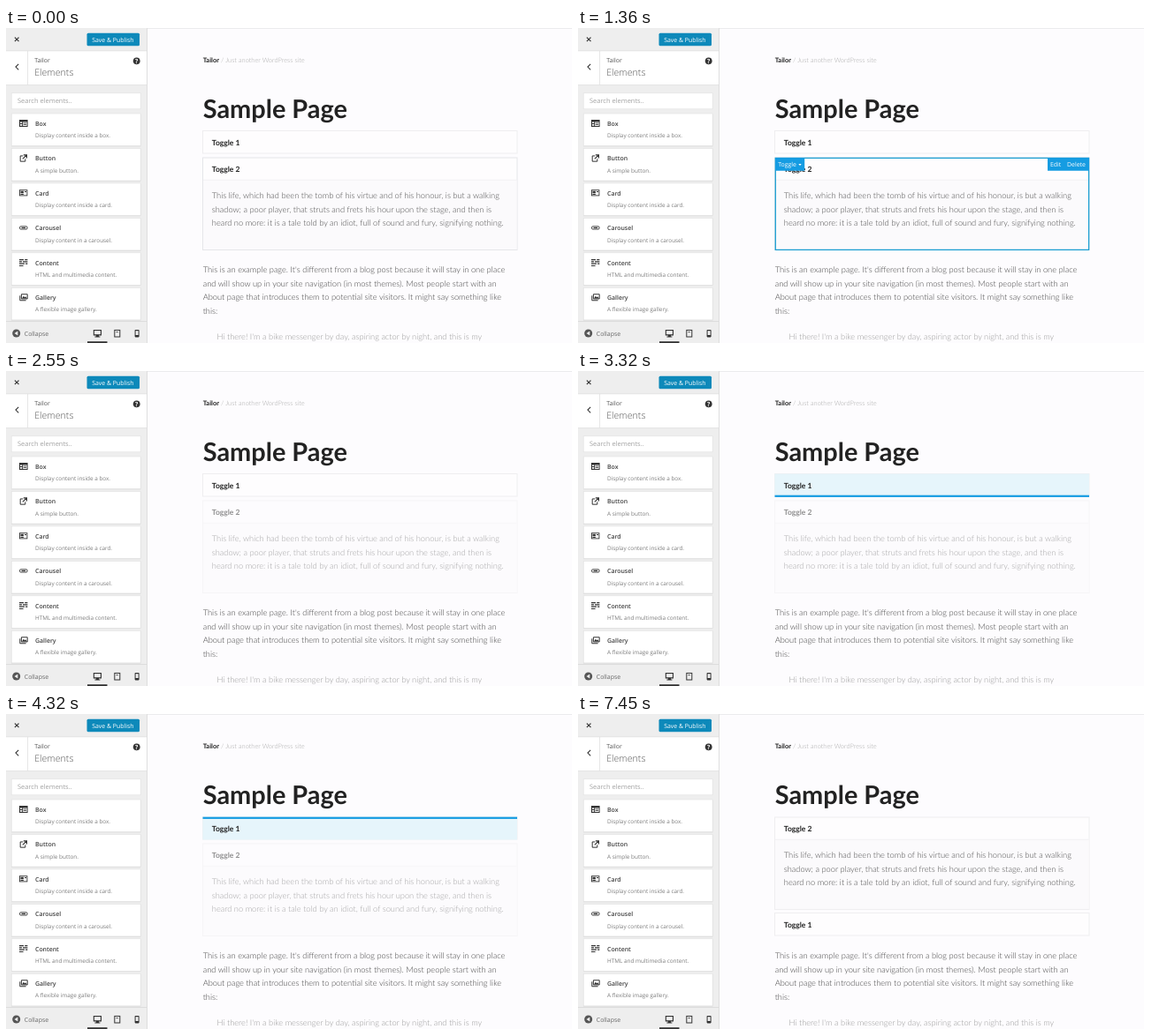
Animation, 640 px wide and 357 px high, one loop 7.72 s. Source, as an HTML page:

```html
<!DOCTYPE html>
<html lang="en">
<head>
<meta charset="utf-8">
<title>Page builder</title>
<style>
  html, body { margin: 0; width: 100%; height: 100%; overflow: hidden; background: #fdfcfe; }
  svg { display: block; width: 100%; height: 100%; }
  text { text-rendering: geometricPrecision; white-space: pre; }

  .ui { font: 6.93px "Open Sans", sans-serif; fill: #555; }
  .ui .heading { font-size: 10.66px; font-weight: 300; }
  .ui .name { font-weight: 600; fill: #404040; }
  .ui .note { font-size: 6.4px; fill: #7c7c7c; }
  .ui .hint { font-size: 7.47px; fill: #a3a3a3; }
  .white { fill: #fff; }
  .panel { fill: #fff; stroke: #e0e0e0; stroke-width: .6; }
  .solid { fill: #333; }
  .line { fill: none; stroke: #333; }

  .page { font: 300 9.27px Lato, sans-serif; fill: #404040; }
  .page .title { font-size: 28.9px; font-weight: 700; fill: #222; }
  .page .site { font-size: 7.47px; fill: #aaa; }
  .page .site tspan { font-weight: 700; fill: #222; }
  .page .label { font-size: 8.53px; font-weight: 700; fill: #222; }
  .page .quote { fill: #999; }
  .page .verse { fill: #4c4c4c; }

  .frame { fill: #fefdfe; stroke: #efeef0; }
  .accent { fill: #159ce2; }

  .t { animation: 7720ms step-end infinite; }
  .second { animation-name: second; }
  .first { animation-name: first; }
  .selection { animation-name: selection; }
  .target { animation-name: target; }
  .bar { animation-name: bar; }
  .edge2 { animation-name: edge2; }

  @keyframes selection { 0%, 32.383% { visibility: hidden } 1.813% { visibility: visible } 100% { visibility: hidden } }
  @keyframes second {
    0% { opacity: 1; transform: none }
    32.383% { opacity: .5; transform: none }
    68.264%, 100% { opacity: 1; transform: translateY(-30px) }
  }
  @keyframes first { 0% { transform: none } 68.264%, 100% { transform: translateY(109px) } }
  @keyframes target { 0%, 68.264%, 100% { visibility: hidden } 41.192% { visibility: visible } }
  @keyframes bar { 0% { transform: none } 48.316%, 100% { transform: translateY(-24px) } }
  @keyframes edge2 { 0%, 68.264% { stroke: #e5e6e9 } 32.383%, 74.223%, 100% { stroke: #efeef0 } }
</style>
</head>
<body>
<svg viewBox="0 0 640 357" preserveAspectRatio="none">
  <rect width="640" height="357" fill="#fdfcfe"/>
  <rect x="160" width="480" height="1" fill="#ebebed"/>

  <g class="page">
    <text class="site" x="222.7" y="39.4"><tspan>Tailor</tspan> / Just another WordPress site</text>
    <text class="title" x="222.8" y="102">Sample Page</text>

    <g class="t first">
      <rect class="frame" x="222.5" y="116.5" width="355.5" height="25.5"/>
      <g class="t target">
        <rect x="222.5" y="116.5" width="355.5" height="26" fill="#e6f5fb"/>
        <rect class="accent t bar" x="222.5" y="140.7" width="355.5" height="2.2"/>
      </g>
      <text class="label" x="232.8" y="132.8">Toggle 1</text>
    </g>

    <g class="t second">
      <rect class="frame t edge2" x="222.5" y="147" width="355.5" height="104.5"/>
      <rect x="223" y="172.5" width="354.5" height="78.5" fill="#fbfafc"/>
      <path d="M223 172.3h354.5" stroke="#f0eff1" stroke-width=".8"/>
      <text class="label" x="232.8" y="162.8">Toggle 2</text>
      <g class="verse" id="verse"></g>
    </g>

    <g id="intro"></g>
    <text class="quote" x="238.5" y="352.6">Hi there! I'm a bike messenger by day, aspiring actor by night, and this is my</text>
  </g>

  <g class="ui t selection">
    <rect x="223.3" y="147.4" width="354.3" height="104" fill="none" stroke="#1c9fd2" stroke-width="1.3"/>
    <path class="accent" d="M223 147.3h33.2v14.4h-33.2zM531 147.3h47v14.4h-47z"/>
    <text class="white" x="226.2" y="157.2">Toggle</text>
    <path class="white" d="M249.3 154h3.4l-1.7 2z"/>
    <text class="white" x="534" y="157.2">Edit</text>
    <text class="white" x="553" y="157.2">Delete</text>
  </g>

  <g class="ui">
    <rect width="159.5" height="357" fill="#eee"/>
    <path class="line" d="M9.9 10.6l4.6 4.6m0-4.6l-4.6 4.6" stroke-width="1.2"/>
    <rect x="91.5" y="5.8" width="59.5" height="14.4" rx="1.5" fill="#0d89ba"/>
    <text class="white" x="97.2" y="15.5">Save &amp; Publish</text>

    <rect y="25.8" width="159.5" height="39" fill="#fff"/>
    <path d="M0 25.8h159.5M0 64.6h159.5M24.6 26v38.5" stroke="#ddd" stroke-width=".8"/>
    <path class="line" d="M14.2 40.8l-3.2 3.3 3.2 3.3" stroke-width="1.1"/>
    <text x="32.2" y="39.3">Tailor</text>
    <text class="heading" x="32.2" y="54.3">Elements</text>
    <circle class="solid" cx="147.7" cy="37.3" r="3.9"/>
    <text class="white" x="147.7" y="39.8" text-anchor="middle" font-weight="700">?</text>

    <rect class="panel" x="6.2" y="73.8" width="146" height="18" stroke="#ddd"/>
    <text class="hint" x="13" y="85.4">Search elements..</text>
    <g id="cards"></g>

    <rect y="332.5" width="159.5" height="24.5" fill="#eee"/>
    <path d="M0 332.5h159.5M159.5 0v357" stroke="#dcdcdc" stroke-width=".9"/>
    <circle cx="11.7" cy="346" r="4.5" fill="#555"/>
    <path d="M13.3 343.5v5l-3.8-2.5z" fill="#eee"/>
    <text x="20.8" y="348.5" fill="#666">Collapse</text>
    <path class="solid" d="M98.8 342h9.2v6.4h-9.2zM101.8 348.3h3.2v1.3h1.4v1h-6v-1h1.4z"/>
    <path d="M99.9 343.1h7v4.1h-7z" fill="#eee"/>
    <rect class="solid" x="92" y="355.2" width="22.5" height="1.8"/>
    <rect class="line" x="122.8" y="342.4" width="6" height="7.6"/>
    <path class="line" d="M124.4 344.6h2.4" stroke-width=".8"/>
    <rect class="solid" x="145.6" y="342" width="5" height="8.4" rx=".8"/>
    <rect x="146.6" y="343.2" width="3" height="4.8" fill="#eee"/>
  </g>
</svg>
<script>
  // Icons are drawn from the top left of a 10 by 9 area.
  const cards = [
    ['Box', 'Display content inside a box.',
      '<path class="solid" d="M0 .5h9.6v8H0z"/><path class="white" d="M1 3h2.2v1.4H1zM1 5.5h2.2v1.8H1zM4.2 3h4.4v4.4H4.2z"/><path class="line" d="M4.8 4.4h3.2M4.8 6h3.2" stroke-width=".8"/>'],
    ['Button', 'A simple button.',
      '<path class="line" d="M4.2 2H1.2v6.2h5.6V5.4"/><path class="line" d="M3.8 5.4l4-4M4.8 .9h3.6v3.6" stroke-width="1.2"/>'],
    ['Card', 'Display content inside a card.',
      '<rect class="line" x=".5" y="1.3" width="8.4" height="6.2" stroke-width=".9"/><path class="solid" d="M1.5 2.4h3.4v2.5H1.5zM6 2.5h2v1H6zM1.5 5.6h3.4v1H1.5z"/>'],
    ['Carousel', 'Display content in a carousel.',
      '<rect class="line" x=".6" y="3" width="8.4" height="3.2" rx="1" stroke-width=".9"/><path class="solid" d="M2.6 4h4.4v1.2H2.6z"/>'],
    ['Content', 'HTML and multimedia content.',
      '<path class="line" d="M0 1.3h5M6.2 1.3h3.2M0 3.6h3M4 3.6h5.4M0 5.9h6M7 5.9h2.4M0 8.2h4.6" stroke-width="1.2"/>'],
    ['Gallery', 'A flexible image gallery.',
      '<path class="line" d="M2.4 1h6.8v5.2H2.4zM.8 2.6V8h6.8"/><path class="solid" d="M3 5.7l1.8-2.6 1.4 1.5 1-1 1.6 2.1z"/>']
  ];
  const put = (id, html) => document.getElementById(id).innerHTML = html;
  const lines = (x, y, rows) =>
    rows.map((row, i) => `<text x="${x}" y="${y + i * 15.5}">${row}</text>`).join('');

  put('cards', cards.map(([name, note, icon], i) => `
    <g transform="translate(0 ${i * 39.45})">
      <rect x="6" y="97.6" width="146.4" height="36.8" fill="#dcdcdc"/>
      <rect class="panel" x="6.2" y="97" width="146" height="36.6"/>
      <g transform="translate(15 103.5)">${icon}</g>
      <text class="name" x="33" y="110.8">${name}</text>
      <text class="note" x="33" y="124.2">${note}</text>
    </g>`).join(''));

  put('verse', lines(232.8, 193.2, [
    'This life, which had been the tomb of his virtue and of his honour, is but a walking',
    'shadow; a poor player, that struts and frets his hour upon the stage, and then is',
    'heard no more: it is a tale told by an idiot, full of sound and fury, signifying nothing.'
  ]));
  put('intro', lines(222.7, 277.4, [
    "This is an example page. It's different from a blog post because it will stay in one place",
    'and will show up in your site navigation (in most themes). Most people start with an',
    'About page that introduces them to potential site visitors. It might say something like',
    'this:'
  ]));
</script>
</body>
</html>
```
